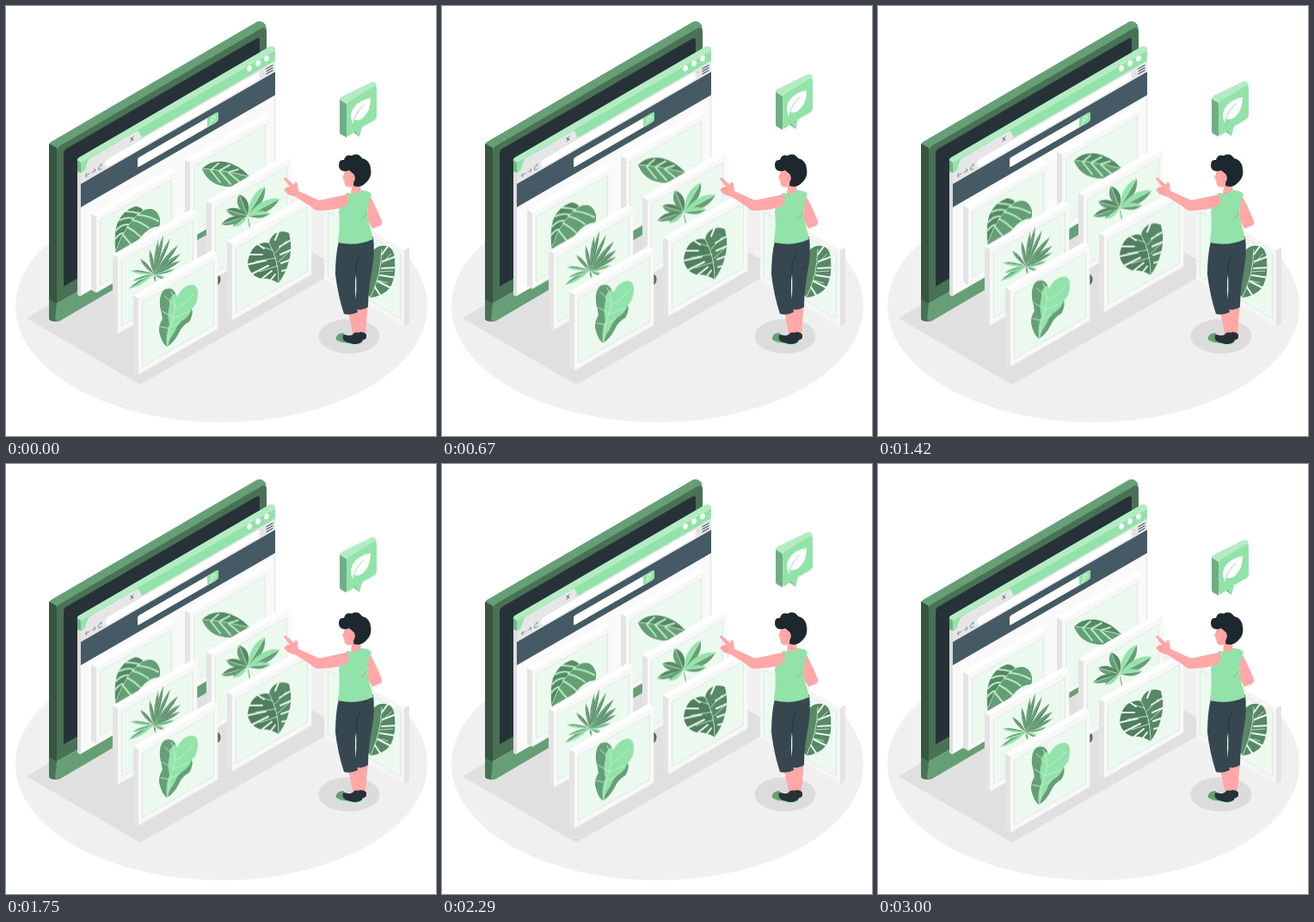
Recreate the animation shown at these times as an HTML page. Size 500 by 500 pixels, loop 3.04 s.

```html
<!DOCTYPE html>
<html lang="en">
<head>
<meta charset="utf-8">
<title>Leaf gallery</title>
<style>
html, body { margin: 0; width: 100%; height: 100%; overflow: hidden; background: #fff; }
svg { display: block; width: 100vw; height: 100vh; }
/* Motion lasts 3000 ms, then rests for 40 ms. */
.float { animation: float 3040ms linear infinite; }
.bubble { animation: bob 3040ms linear infinite; }
@keyframes float {
  0%, 98.684%, 100% { transform: translateY(0); }
  49.342% { transform: translateY(-10px); }
}
@keyframes bob {
  0%, 49.342%, 98.684%, 100% { transform: translateY(0); }
  24.671%, 74.013% { transform: translateY(-10px); }
}
.light { fill: #92e3a9; }
.mid { fill: #669f76; }
.deep { fill: #588865; }
.dark { fill: #497155; }
.skin { fill: #ffa8a7; }
.line { fill: none; stroke-linecap: round; stroke-linejoin: round; }
.slit { stroke: #eaf8ee; stroke-width: 2; }
.band { stroke: #b3ecc3; stroke-width: 2; }
.rib { stroke: #c4eed0; stroke-width: .9; }
</style>
</head>
<body>
<svg viewBox="0 0 500 500" xmlns="http://www.w3.org/2000/svg">
<defs>
  <g id="card">
    <path fill="#fff" d="M-6-3.5 86-56.5 92-53 0 0Z"/>
    <path fill="#e4e4e4" d="M-6-3.5 0 0V88.5L-6 85Z"/>
    <g transform="matrix(1 -.577 0 1 0 0)">
      <rect width="92.3" height="88.5" fill="#f8f8f8"/>
      <rect x="4.5" y="7" width="83" height="75" fill="#ebf9ef" stroke="#d9e6dd" stroke-width=".8"/>
    </g>
  </g>
</defs>

<ellipse cx="250.500" cy="349" rx="239.500" ry="135" fill="#f0f0f0"/>
<path fill="#e0e0e0" d="M27 361Q23 363 27 365L152 438Q156 441 160 438L382 310Q388 305 382 301L345 280 200 262Z"/>
<ellipse cx="399" cy="384" rx="35.500" ry="20" fill="#dcdcdc"/>

<!-- monitor -->
<path class="mid" d="M50 162Q50 159 54 157L289 20Q294 16 299 19L302 22 303 30 60 170Z"/>
<path fill="#37553f" d="M50 160 59 165V367L52 366Q50 365 50 361Z"/>
<path class="dark" d="M59 169Q59 165 63 162.500L296 26.500Q303 23 303 30V205L59 346Z"/>
<path class="dark" d="M50 341 59 346V367L53 366Q50 365 50 361Z"/>
<path class="mid" d="M59 346 303 205V225L63 366Q59 368 57 366Z"/>
<path fill="#263238" d="M67 172Q67 168 70 166L291 38Q295 36 295 40V195L67 326Z"/>
<ellipse cx="245" cy="318" rx="4.500" ry="6.500" class="dark"/>

<!-- browser window -->
<path fill="#b3ecc3" d="M83 181Q82 178 85 176L305 48Q309 45 313 49V53L87 184Z"/>
<path fill="#74b687" d="M83 179 87 182V195L83 193Z"/>
<path fill="#dedede" d="M83 192 87 194V338L83 336Z"/>
<g transform="matrix(1 -.577 0 1 87 182)">
  <rect width="226" height="155" fill="#fafafa"/>
  <rect width="226" height="13" class="light"/>
  <path fill="#e6e6e6" d="M4 13 8 3Q9 1 11 1H64Q67 1 68 4L71 13Z"/>
  <rect y="12" width="226" height="13.500" fill="#e6e6e6"/>
  <rect x="28" y="14" width="181" height="9" rx="4.500" fill="#fff"/>
  <rect y="25" width="226" height="27" fill="#455a64"/>
  <rect x="66" y="33" width="93" height="11" rx="2" fill="#fff"/>
  <path class="light" d="M147 33H158Q160 33 160 35V42Q160 44 158 44H147Z"/>
  <g class="line" stroke="#7d8a90" stroke-width=".8">
    <path d="M10 18.500H5.500M7 16.500 5.500 18.500 7 20.500M12.500 18.500H17M15.500 16.500 17 18.500 15.500 20.500M24 17A2 2.500 0 1 0 24 20.500M24 15V17H22.500"/>
    <path stroke="#455a64" d="M58 5 61 9M61 5 58 9"/>
    <circle cx="210" cy="18.500" r="2.200" stroke="#d5d5d5"/>
  </g>
  <path class="line" stroke="#455a64" stroke-width="1.300" d="M216 15.500H223M216 18.500H223M216 21.500H223"/>
  <g class="line" stroke="#e8fbee" stroke-width=".9"><circle cx="154" cy="37.500" r="2.200"/><path d="M152.500 39.500 150.500 42"/></g>
  <path class="line" stroke="#e0e0e0" stroke-width="1" d="M225.700 53V155"/>
</g>
<g fill="#fff"><ellipse cx="283" cy="72.500" rx="2.700" ry="3.500" transform="rotate(20 283 72.500)"/><ellipse cx="293" cy="66.800" rx="2.700" ry="3.500" transform="rotate(20 293 66.800)"/><ellipse cx="303" cy="61" rx="2.700" ry="3.500" transform="rotate(20 303 61)"/></g>

<!-- floating cards, back to front -->
<g class="float">
  <use href="#card" x="214" y="182"/>
  <path class="deep" d="M228 189Q238 179 254 181 270 184 283 198 270 213 252 209 235 206 228 189Z"/>
  <path class="mid" d="M228 189Q255 191 283 198 270 213 252 209 235 206 228 189Z"/>
  <path class="line band" d="M239 190 247 183M249 191 260 185M260 193 270 190M238 191 249 205M248 192 261 207M259 194 271 204"/>
  <path class="line rib" d="M229 189Q255 191 285 199"/>

  <use href="#card" x="105" y="245"/>
  <path class="deep" d="M128 290Q125 268 129 254 135 238 150 233 156 233 160 238 170 233 176 241 181 249 178 256 167 256 157 268 145 284 128 290Z"/>
  <path class="mid" d="M160 238Q170 233 176 241 181 249 178 256 167 256 157 268 145 284 128 290 138 254 160 238Z"/>
  <path class="line band" d="M155 241Q147 239 140 239M148 247Q140 245 132 249M142 254Q135 253 128 261M136 264Q131 265 127 271M153 243Q164 243 177 250M147 249Q157 251 166 258M141 257Q149 261 156 268M136 266 145 277"/>
  <path class="line rib" d="M163 235Q140 249 128 284"/>

  <use href="#card" x="239" y="230"/>
  <g id="umbrella"></g>

  <use href="#card" x="130" y="292.500"/>
  <g id="palm"></g>

  <use href="#card" x="263" y="277"/>
  <path class="deep" d="M306 276Q307 267 316 263 324 261 329 264 334 281 328 300 325 311 317 322 306 316 297 317 284 314 281 300 283 282 294 277 301 274 306 276Z"/>
  <path class="dark" d="M306 276Q316 295 317 322 306 316 297 317 284 314 281 300 283 282 294 277 301 274 306 276Z" opacity=".45"/>
  <path class="line slit" d="M280 289 298 289M279 301 302 296M283 313 305 302M294 320 309 308M306 321 313 312M290 275 300 282M333 271 318 280M335 282 319 289M334 294 320 299M330 306 321 308M318 260 313 272"/>
  <path class="line rib" d="M306 276Q317 295 317 321M310 284 298 280M314 293 290 297M316 302 295 309M313 287 326 273M316 298 329 286"/>

  <use href="#card" x="154" y="340"/>
  <path class="light" d="M199 338Q205 325 216 324 223 324 223 334 223 347 216 352 218 359 213 367 205 371 201 380 195 392 187 396 181 392 178 378 178 370 182 364 181 356 179 349 178 335 184 330 194 324 199 338Z"/>
  <path class="mid" d="M197 334Q193 326 184 330 178 335 179 349 181 356 182 364 178 370 178 378 181 392 187 396 185 382 190 370 187 358 190 348 189 338 197 334Z"/>
  <path class="mid" d="M216 352Q218 359 213 367 205 371 201 380 195 392 187 396 190 387 196 379 199 369 208 364 214 359 216 352Z"/>
  <path class="line rib" d="M192 332Q200 345 194 363 189 377 188 395M196 354Q208 346 218 335M194 363Q205 359 213 355M191 374 202 368M197 349 184 337M194 362 182 355M190 375 180 373"/>
</g>

<!-- card behind the visitor -->
<path fill="#fff" d="M370 230 376 227 469 280.500 463 284Z"/>
<path fill="#e4e4e4" d="M463 284 469 280.500V369L463 372.500Z"/>
<g transform="matrix(1 .577 0 1 370 230)">
  <rect width="93" height="88.500" fill="#f5f5f5"/>
  <rect x="4.500" y="7" width="84" height="75" fill="#ebf9ef" stroke="#d9e6dd" stroke-width=".8"/>
</g>
<path class="deep" d="M427 284Q435 276 445 280 452 284 452 296 454 313 447 327 439 337 424 339 410 325 412 304 418 286 427 284Z"/>
<path class="line slit" d="M454 291 438 297M456 304 437 305M454 316 435 313M448 328 432 320M437 339 429 327M445 278 437 289"/>
<path class="line rib" d="M437 283Q436 315 424 338M436 300 448 288M435 309 450 308M432 319 444 322"/>

<!-- visitor -->
<path class="skin" d="M421 217Q428 228 437 250 438 254 434 256L426 259 420 248Z"/>
<path class="skin" d="M397 350 411 350 415 383 404 385ZM409 345 421 345 418 381 411 382Z"/>
<path fill="#263238" d="M411 379Q417 379 419 382L419 386Q415 390 408 389Z"/>
<path fill="#263238" d="M393 382Q402 385 405 380 412 378 415 385L414 391Q409 395 398 392 386 391 384 387 385 381 393 382Z"/>
<path class="mid" d="M393 380Q384 380 384 387 386 392 396 391 389 388 393 380Z"/>
<path class="line" stroke="#92e3a9" stroke-width="1" d="M385 389Q390 392 398 392 408 396 414 391"/>
<path fill="#37474f" d="M387 273Q383 290 383 312 386 337 393 358 401 360 409 356 404 330 407 310 408 330 406 352 414 355 421 350 421 331 426 304 429 286 427 268Z"/>
<path class="line" stroke="#263238" stroke-width=".9" d="M407 314Q406 298 412 288"/>
<path class="skin" d="M394 187 393 195 391 200 393 202 394 208Q397 212 402 210L401 220H412L413 196Z"/>
<path class="light" d="M397 217Q406 221 413 214 424 215 425 219 420 232 420 245 424 258 427 271 408 280 386 275 389 255 387 239 388 224 397 217Z"/>
<path class="line" stroke="#74b687" stroke-width=".8" d="M420 240Q418 245 413 248"/>
<path class="skin" d="M397 219Q401 224 396 232 387 237 364 238 359 238 354 233L337 222Q328 220 326 217L323 214 326 211 330 210 323 201Q323 199 326 200L335 208 336 205Q339 204 339 208L340 215 364 226Z"/>
<path class="line" stroke="#f28f8f" stroke-width=".7" d="M326 214 331 212M328 217 332 215"/>
<path fill="#1d282e" d="M396 192Q387 193 387 185 387 178 393 179 395 172 402 174 409 170 414 177 423 179 424 189 426 199 418 206 412 212 404 209L405 196 399 191Z"/>
<ellipse class="skin" cx="402.500" cy="200" rx="3.300" ry="4.500"/>
<path class="line" stroke="#f28f8f" stroke-width=".7" d="M401 202Q401 198 404 198"/>

<!-- speech bubble -->
<g class="bubble">
  <path fill="#b3ecc3" d="M388 110Q387 107 391 105L425 88.500Q430 87 431 93L396 115Z"/>
  <path fill="#6fae82" d="M388 109 396 114V153L389 149Q388 148 388 146Z"/>
  <path fill="#6fae82" d="M403 146 411 152 412 143Z"/>
  <path class="light" d="M396 116Q396 113 399 111L427 94Q431 92 431 96V128Q431 131 428 133L414 141 411 152 406 146 399 151Q396 153 396 149Z"/>
  <path fill="#fff" d="M403 137Q398 125 406 116 413 109 424 107 424 122 416 129 411 134 405 132.500Z"/>
  <path class="line" stroke="#92e3a9" stroke-width="1" d="M404 134Q407 123 416 115"/>
</g>
</svg>
<script>
// Each blade is [tipX, tipY, width], growing out of one base point.
function blades(id, bx, by, list, fills, rib) {
  const shapes = list.map(([x, y, w]) => {
    const dx = x - bx, dy = y - by, len = Math.hypot(dx, dy);
    const nx = -dy / len * w, ny = dx / len * w;
    const mx = bx + dx * .6, my = by + dy * .6;
    const half = (s, fill) =>
      `<path class="${fill}" d="M${bx} ${by}Q${mx + nx * s} ${my + ny * s} ${x} ${y}Z"/>`;
    return half(1, fills[0]) + half(-1, fills[1]) +
      (rib ? `<path class="line rib" stroke-opacity=".7" d="M${bx} ${by}L${x} ${y}"/>` : "");
  });
  document.getElementById(id).insertAdjacentHTML("beforeend", shapes.join(""));
}

blades("umbrella", 281, 244, [[271, 219, 12], [256, 237, 10], [250, 254, 9], [284, 260, 1.5]], ["deep", "mid"], true);
blades("umbrella", 281, 244, [[301, 210, 12], [318, 224, 12], [307, 241, 8], [264, 257, 7]], ["mid", "light"], true);

blades("palm", 172, 312, [[143, 329, 5], [147, 320, 4], [145, 308, 4], [196, 306, 4], [186, 317, 4]], ["mid", "light"], false);
blades("palm", 172, 312, [
  [156, 294, 4], [167, 283, 4], [177, 272, 4], [183, 266, 4], [191, 270, 4],
  [200, 278, 5], [203, 288, 5], [203, 296, 4], [174, 321, 2]
], ["deep", "mid"], false);
</script>
</body>
</html>
```
